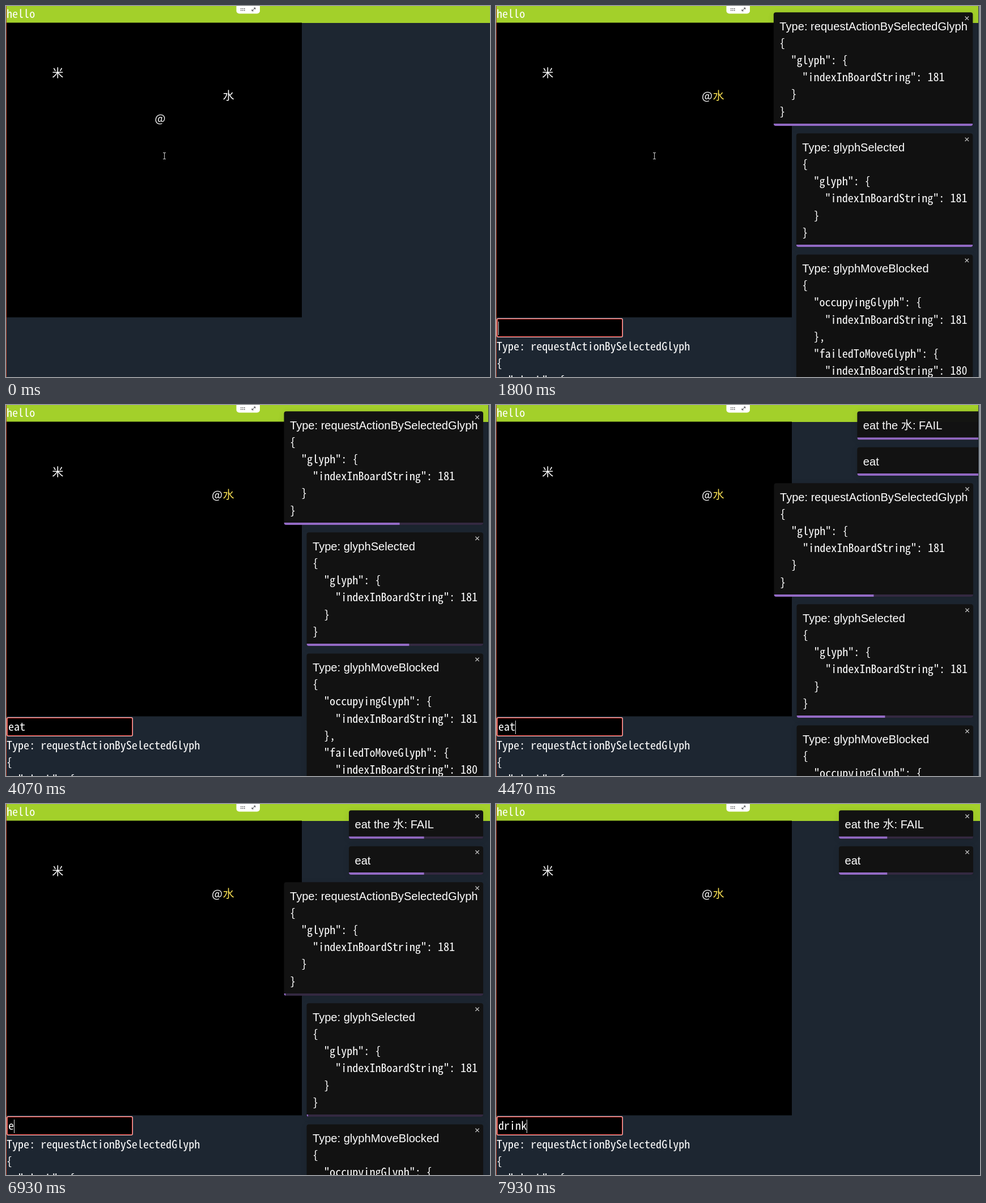
These frames come from a looping animation (854x656 px, 8000 ms). An HTML page with a canvas:

```html
<!DOCTYPE html>
<html lang="en">
<head>
<meta charset="utf-8">
<title>Glyph board</title>
<style>
html, body { margin: 0; width: 100%; height: 100%; overflow: hidden; background: #1d2631; }
canvas { display: block; }
</style>
</head>
<body>
<canvas id="stage" width="854" height="656"></canvas>
<script>
const ctx = document.getElementById('stage').getContext('2d');
const LOOP = 8000;
const EM = 20.08;
const SANS = `${EM}px "Liberation Sans", "Noto Sans CJK SC", "Noto Sans CJK JP", sans-serif`;
const CJK = `${EM}px "Noto Sans CJK SC", "Noto Sans CJK JP", "Noto Sans CJK", sans-serif`;
const monoFont = size => `${size}px "Noto Sans Mono CJK SC", "Noto Sans Mono CJK JP", "Noto Sans Mono", monospace`;

// Choose the size that gives a pitch of half an em.
ctx.font = monoFont(EM);
const PITCH = EM / 2;
const MONO = monoFont(EM * PITCH / ctx.measureText('M').width);

// Time, column and row of each step of the player.
const steps = [
  [0, 13, 8], [130, 14, 7], [330, 15, 7], [600, 16, 7],
  [730, 17, 7], [930, 17, 6], [1200, 18, 6]
];
const typing = [
  [1470, ''], [2930, 'e'], [3000, 'ea'], [3130, 'eat'], [6800, 'ea'], [6930, 'e'], [7060, ''],
  [7200, 'd'], [7330, 'dr'], [7460, 'dri'], [7530, 'drin'], [7670, 'drink']
];

const LINE = 1.5 * EM, PAD = EM / 2, GAP = 13.3, RIGHT = 842;
const SELECT = 1470;
const events = { enter: 1446.5, run: 1970 };
const replies = { enter: 4141, run: 4728 };
const glyphBody = ['{', '  "glyph": {', '    "indexInBoardString": 181', '  }', '}'];
const toasts = [
  { ...replies, width: 237, lines: ['eat the 水: FAIL'] },
  { ...replies, width: 237, lines: ['eat'] },
  { ...events, width: 351.5, lines: ['Type: requestActionBySelectedGlyph', ...glyphBody] },
  { ...events, width: 311.5, lines: ['Type: glyphSelected', ...glyphBody] },
  { ...events, width: 311.5, lines: [
    'Type: glyphMoveBlocked', '{',
    '  "occupyingGlyph": {', '    "indexInBoardString": 181', '  },',
    '  "failedToMoveGlyph": {', '    "indexInBoardString": 180', '  }', '}'
  ] }
];

const clamp = v => Math.min(1, Math.max(0, v));
const latest = (list, t) => list.filter(item => item[0] <= t + 6).pop();

function bezier(x1, y1, x2, y2) {
  const at = (a, b, s) => 3 * a * s * (1 - s) ** 2 + 3 * b * s * s * (1 - s) + s ** 3;
  return x => {
    let lo = 0, hi = 1;
    for (let i = 0; i < 24; i++) {
      const mid = (lo + hi) / 2;
      if (at(x1, x2, mid) < x) lo = mid; else hi = mid;
    }
    return at(y1, y2, lo);
  };
}
const easeOut = bezier(.215, .61, .355, 1);
const ease = bezier(.25, .1, .25, 1);
const bounceIn = [[0, 3000, 0], [.6, -25, 1], [.75, 10, 1], [.9, -5, 1], [1, 0, 1]];
const bounceOut = [[0, 0, 1], [.2, -20, 1], [1, 2000, 0]];

// Keys hold [progress, x offset, opacity].
function keyframes(keys, p, easing) {
  const i = Math.max(1, keys.findIndex(k => k[0] >= p));
  const [from, x0, a0] = keys[i - 1], [to, x1, a1] = keys[i];
  const e = easing((p - from) / (to - from));
  return [x0 + (x1 - x0) * e, a0 + (a1 - a0) * e];
}

function rect(x, y, w, h, color, radius = 0) {
  ctx.fillStyle = color;
  ctx.beginPath();
  ctx.roundRect(x, y, w, h, radius);
  ctx.fill();
}

function text(str, x, y, font = MONO, color = '#fff', align = 'left') {
  ctx.font = font;
  ctx.fillStyle = color;
  ctx.textAlign = align;
  ctx.fillText(str, x, y);
}

function lines(color, width, ...segments) {
  ctx.strokeStyle = color;
  ctx.lineWidth = width;
  ctx.beginPath();
  for (const [x0, y0, x1, y1] of segments) {
    ctx.moveTo(x0, y0);
    ctx.lineTo(x1, y1);
  }
  ctx.stroke();
}

function drawBoard(t) {
  rect(0, 0, 854, 30, '#a3d02a');
  text('hello', 1, 21);
  rect(0, 29.5, 522, 521, '#000');
  const glyph = (char, column, row, color) =>
    text(char, 11 + EM * column, 45.5 + EM * row, CJK, color, 'center');
  const [, column, row] = latest(steps, t);
  glyph('米', 4, 4);
  glyph('水', 19, 6, t < SELECT ? '#fff' : '#f7df52');
  glyph('@', column, row);
}

function drawInput(t) {
  rect(1, 552, 223, 34, '#e8c4c4', 3);
  rect(2, 553, 221, 32, '#dd2c28', 2);
  rect(3, 554, 219, 30, '#000', 1);
  const [since, value] = latest(typing, t);
  text(value, 4, 576);
  if (Math.floor(Math.max(0, t - since) / 500) % 2 === 0) {
    rect(Math.round(4 + PITCH * value.length), 558, 1, 24, '#ddd');
  }
  ['Type: requestActionBySelectedGlyph', '{', '  "glyph": {']
    .forEach((line, i) => text(line, 1, 609 + LINE * i));
}

function drawToast({ enter, run, width, lines: rows }, top, t) {
  const end = run + 5000;
  const [shift, alpha] = t < end
    ? keyframes(bounceIn, clamp((t - enter) / 700), easeOut)
    : keyframes(bounceOut, clamp((t - end) / 700), ease);
  const height = rows.length * LINE + 2 * PAD;
  ctx.save();
  ctx.globalAlpha = alpha;
  ctx.translate(RIGHT - width + shift, top);
  ctx.shadowColor = 'rgba(0, 0, 0, .1)';
  ctx.shadowBlur = 12;
  ctx.shadowOffsetY = 2;
  rect(0, 0, width, height, '#121212', 4);
  ctx.shadowColor = 'transparent';
  ctx.clip();
  rect(0, height - 4, width, 4, '#342941');
  rect(0, height - 4, width * (1 - clamp((t - run) / 5000)), 4, '#936ac4');
  rows.forEach((row, i) => text(row, 10.5, 31.8 + LINE * i, i ? MONO : SANS));
  const cx = width - 10.5, cy = 10.5, r = 3.2;
  lines('#c4c4c4', 1.3, [cx - r, cy - r, cx + r, cy + r], [cx - r, cy + r, cx + r, cy - r]);
  ctx.restore();
}

function drawToasts(t) {
  let top = 11.2;
  for (const toast of toasts) {
    if (t < toast.enter) continue;
    drawToast(toast, top, t);
    top += toast.lines.length * LINE + 2 * PAD + GAP;
  }
}

function drawScrollbar(t) {
  ctx.globalAlpha = 1 - clamp((t - 5600) / 300);
  rect(851, 0, 3, 656, '#1d2631');
  rect(852, 0, 1.5, 656, '#b4b9be');
  ctx.globalAlpha = 1;
}

function drawTab() {
  rect(406.5, -6, 41.5, 19.5, '#fff', 5);
  for (let i = 0; i < 6; i++) rect(414 + 3 * (i % 3), i < 3 ? 4 : 7, 1.5, 1.5, '#444');
  lines('#444', 1, [434, 8.5, 439.5, 3.5], [437.3, 3.3, 440, 3.3], [439.7, 3.3, 439.7, 6],
    [434, 6.2, 434, 8.9], [434, 8.7, 436.7, 8.7]);
}

function drawPointer(t) {
  if (t > 3050) return;
  const p = clamp((t - 2050) / 700);
  const e = p * p * (3 - 2 * p);
  const x = Math.round(279 - 6 * e) + .5, y = Math.round(265 + 150 * e);
  lines('#ccc', 1, [x, y - 5.5, x, y + 5.5], [x - 2.5, y - 5.5, x + 2.5, y - 5.5],
    [x - 2.5, y + 5.5, x + 2.5, y + 5.5]);
}

function draw(t) {
  rect(0, 0, 854, 656, '#1d2631');
  drawBoard(t);
  if (t >= SELECT) {
    drawInput(t);
    drawToasts(t);
    drawScrollbar(t);
  }
  rect(0, 0, 1, 656, '#b8452f');
  drawTab();
  drawPointer(t);
}

// From the selection on, the picture advances at 15 steps per second.
const TICK = 66.59;
const quantize = t => t < SELECT ? t : SELECT + Math.floor((t - SELECT + 6) / TICK) * TICK;

const start = performance.now();
function frame() {
  draw(quantize((performance.now() - start) % LOOP));
  requestAnimationFrame(frame);
}
frame();
</script>
</body>
</html>
```
